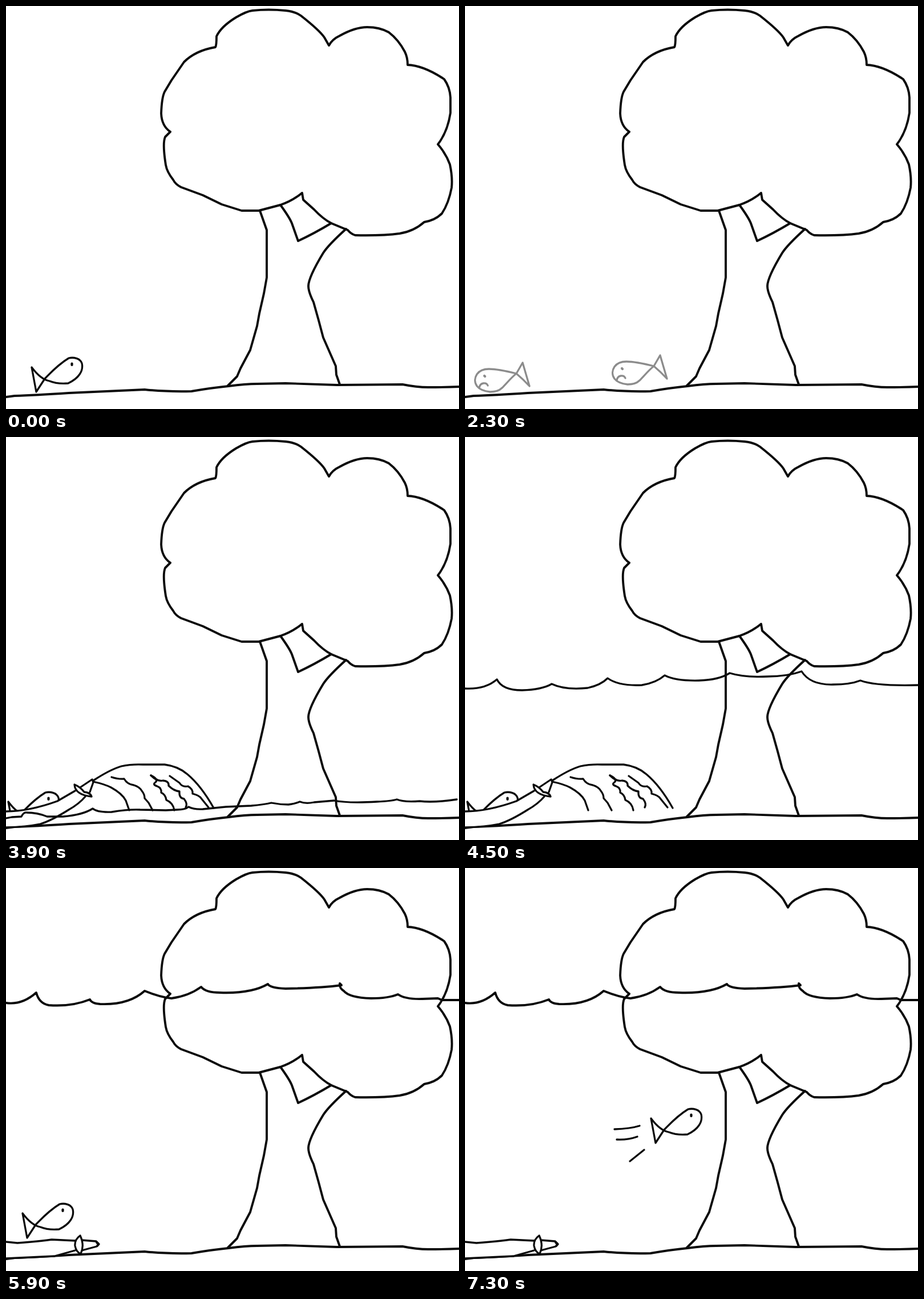
Animation of 794 by 705 pixels, one loop 8 s. Source, as an HTML page without scripts:

```html
<!DOCTYPE html>
<html lang="en">
<head>
<meta charset="utf-8">
<title>Fish and tree</title>
<style>
html, body { margin: 0; width: 100%; height: 100%; overflow: hidden; background: #fff; }
svg { display: block; width: 100vw; height: 100vh; }
.ink { fill: none; stroke: #0a0a0a; stroke-width: 3.3; stroke-linecap: round; stroke-linejoin: round; }
.bold { stroke-width: 3.9; }
.solid { fill: #fff; }
.cover { fill: #fff; stroke: none; }

/* Poses cross over with one half-tone step of 100 ms; --t is when a pose begins to show. */
.short, .mid, .long, .hosing { animation: short 8s step-end infinite; animation-delay: calc(var(--t) - 8s); }
.mid { animation-name: mid; }
.long { animation-name: long; }
.hosing { animation-name: hosing; }
.first { animation: first 8s step-end infinite; }
.flood { animation: flood 8s step-end infinite; }
.dropped { animation: dropped 8s step-end infinite; }
.last { animation: last 8s step-end infinite; }

@keyframes short { 0% { opacity: .47 } 1.25% { opacity: 1 } 7.5% { opacity: .47 } 8.75%, 100% { opacity: 0 } }
@keyframes mid { 0% { opacity: .47 } 1.25% { opacity: 1 } 10% { opacity: .47 } 11.25%, 100% { opacity: 0 } }
@keyframes long { 0% { opacity: .47 } 1.25% { opacity: 1 } 11.25% { opacity: .47 } 12.5%, 100% { opacity: 0 } }
@keyframes hosing { 0% { opacity: .47 } 1.25% { opacity: 1 } 32.5% { opacity: .47 } 33.75%, 100% { opacity: 0 } }
@keyframes first { 0% { opacity: 1 } 6.25% { opacity: .47 } 7.5%, 100% { opacity: 0 } }
@keyframes flood { 0% { opacity: 0 } 62.5% { opacity: .47 } 63.75%, 100% { opacity: 1 } }
@keyframes dropped { 0% { opacity: 0 } 72.5% { opacity: .47 } 73.75%, 100% { opacity: 1 } }
@keyframes last { 0% { opacity: 0 } 90% { opacity: .47 } 91.25%, 100% { opacity: 1 } }
</style>
</head>
<body>
<svg viewBox="0 0 794 705" preserveAspectRatio="none">
  <defs>
    <!-- origin is where the tail lines cross -->
    <g id="fish">
      <path d="M-15 23L0 0C8-8 22-24 42-36C50-38 62-36 65-27C68-14 60-1 41 8C30 9 18 8 8 4C-3 2-14-8-23-20Z"/>
      <path d="M47.5-26.5v2.5" stroke-width="4.2"/>
    </g>
    <g id="sad">
      <path d="M11-19L0 0C-8 6-18 18-25 25C-31 31-38 32-46 32C-56 31-65 27-69 22C-74 15-73 7-69 1C-64-6-57-8-48-8C-32-8-16-4 0 0Q12 10 23 22Z"/>
      <path d="M-56 4l1 1" stroke-width="4.2"/>
      <path d="M-65 25Q-64 18-58 17Q-52 16-50 21"/>
    </g>
    <g id="stream">
      <path d="M153 601Q182 582 202 576Q220 572 240 573L278 573Q302 576 318 590Q342 610 364 649"/>
      <path d="M153 603Q172 607 184 613Q204 624 210 636L216 653"/>
      <path d="M185 595Q197 599 207 598Q213 608 224 609Q234 612 238 619Q243 625 243 632L250 640L257 653"/>
      <path d="M254 592Q268 599 262 604Q256 608 265 611Q273 614 272 622Q280 626 281 635Q293 640 295 653"/>
      <path d="M254 592Q265 603 275 601Q286 602 285 610Q294 619 304 620Q303 632 312 633Q319 642 315 648"/>
      <path d="M287 593L304 605Q309 613 319 611Q328 616 327 624Q339 627 342 632L355 648"/>
    </g>
  </defs>

  <rect width="794" height="705" fill="#fff"/>

  <g class="ink bold">
    <path d="M0 684L15 682Q50 681 110 677L243 671Q280 675 325 674Q360 668 390 665Q420 661 440 661L490 660L580 663L695 662Q720 667 740 667Q770 667 794 666"/>
    <path d="M367 72Q369 69 369 53Q377 36 403 20Q422 9 432 8Q460 5 490 8Q508 10 517 17Q550 43 558 55L566 69Q572 58 585 52Q612 37 633 37Q655 37 671 46Q688 59 699 80Q704 90 704 103Q732 104 768 128Q778 142 779 160L779 187Q774 220 757 242Q771 258 778 277Q783 300 781 318Q776 345 764 363Q752 375 733 378Q715 394 690 398Q660 402 612 401Q605 399 599 392L570 380Q555 372 540 356L521 339L519 327Q502 341 481 348L443 358L413 358L378 347L345 331L307 317Q297 312 293 304Q282 290 280 278Q274 240 279 229L288 220Q273 210 272 188Q273 160 278 150L290 130L312 98Q332 78 367 72Z"/>
    <path d="M481 348Q497 370 501 380L512 411Q540 398 570 380"/>
    <path d="M445 358L457 392V475L452 503L444 538L440 560L428 602L411 634L405 648L389 664"/>
    <path d="M596 390Q565 418 556 432Q530 475 530 490Q530 500 539 518L548 550L556 580L578 630L579 645L585 662"/>
  </g>

  <g class="ink">
    <use class="first" href="#fish" x="68" y="652"/>
    <use class="short" style="--t:.5s" href="#fish" x="298" y="646"/>
    <g class="short" style="--t:1.1s">
      <use href="#fish" transform="translate(382 618) rotate(-37)"/>
      <path d="M415 584C414 576 418 571 425 573"/>
    </g>
    <use class="short" style="--t:1.7s" href="#sad" x="331" y="630"/>
    <use class="long" style="--t:2.3s" href="#sad" x="90" y="643"/>
  </g>

  <!-- fish holding the hose -->
  <g class="ink hosing" style="--t:3.2s">
    <use href="#fish" x="27" y="658"/>
    <path class="cover" d="M0 655Q40 655 90 637L121 619L139 629Q105 662 60 677L40 680L0 682Z"/>
    <path d="M0 655Q40 655 90 637L121 619M139 629Q128 642 110 652Q80 671 60 677Q35 682 0 683"/>
    <path class="solid" d="M130 613L151 599L153 604L147 621"/>
    <path class="solid" d="M120 608Q121 626 150 629Q148 622 137 621Q130 612 120 608Z"/>
  </g>

  <!-- rising water -->
  <g class="ink short" style="--t:3.8s">
    <use href="#stream"/>
    <path d="M0 667L10 665L27 664Q31 656 36 657Q55 657 72 664L100 664Q135 661 152 650Q160 657 185 656Q215 651 235 652L280 653L300 652Q314 652 320 647Q330 652 345 651L385 647L430 645Q452 643 465 640Q480 643 495 643Q508 641 515 638Q525 642 540 639L575 636Q600 641 650 638Q675 637 685 634Q697 639 725 637Q750 640 790 634"/>
  </g>
  <g class="ink short" style="--t:4.4s">
    <use href="#stream"/>
    <path d="M0 440Q35 442 56 424Q65 443 100 443Q135 442 152 432Q175 443 215 439Q238 434 250 422Q270 436 310 434Q335 430 350 417Q370 427 410 426Q445 425 464 413Q490 421 530 419Q565 419 590 410Q605 434 645 433Q675 433 693 426Q720 436 794 434"/>
  </g>
  <path class="ink mid" style="--t:5s" d="M154 594L161 588M159 599L167 597M161 603L169 607"/>
  <path class="ink bold flood" d="M0 236Q28 240 53 218Q58 237 75 240Q115 243 147 230Q150 237 165 238Q215 240 243 215Q270 226 290 228Q320 224 342 208Q350 218 375 218Q430 220 459 203Q463 210 490 211Q550 210 588 205L585 202Q584 210 592 215Q602 227 640 228Q670 228 687 221Q700 230 730 229L757 228L764 231H794"/>

  <!-- hose on the ground -->
  <g class="ink dropped">
    <path class="cover" d="M0 654L20 656L80 650L121 652V669L85 679L0 682Z"/>
    <path d="M0 654L20 656Q60 653 80 650L121 652M0 683L85 679L121 669"/>
    <path class="solid" d="M133 651L158 653L163 658L159 662L133 669"/>
    <path d="M159 655L162 658L160 661" stroke-width="4"/>
    <path class="solid" d="M130 643Q120 650 121 661Q123 672 131 675Q138 660 130 643Z"/>
  </g>

  <!-- swimming off -->
  <g class="ink">
    <use class="short" style="--t:5.8s" href="#fish" x="52" y="624"/>
    <g class="mid" style="--t:6.4s">
      <use href="#fish" transform="translate(95 595) rotate(-18.5)"/>
      <path d="M24 606L45 605L55 601M35 628L50 622L64 614M63 638L74 623"/>
    </g>
    <g class="last">
      <use href="#fish" x="349" y="458"/>
      <path d="M262 457Q290 456 306 451M266 475Q285 476 302 470M289 513L314 493"/>
    </g>
  </g>
</svg>
</body>
</html>
```
